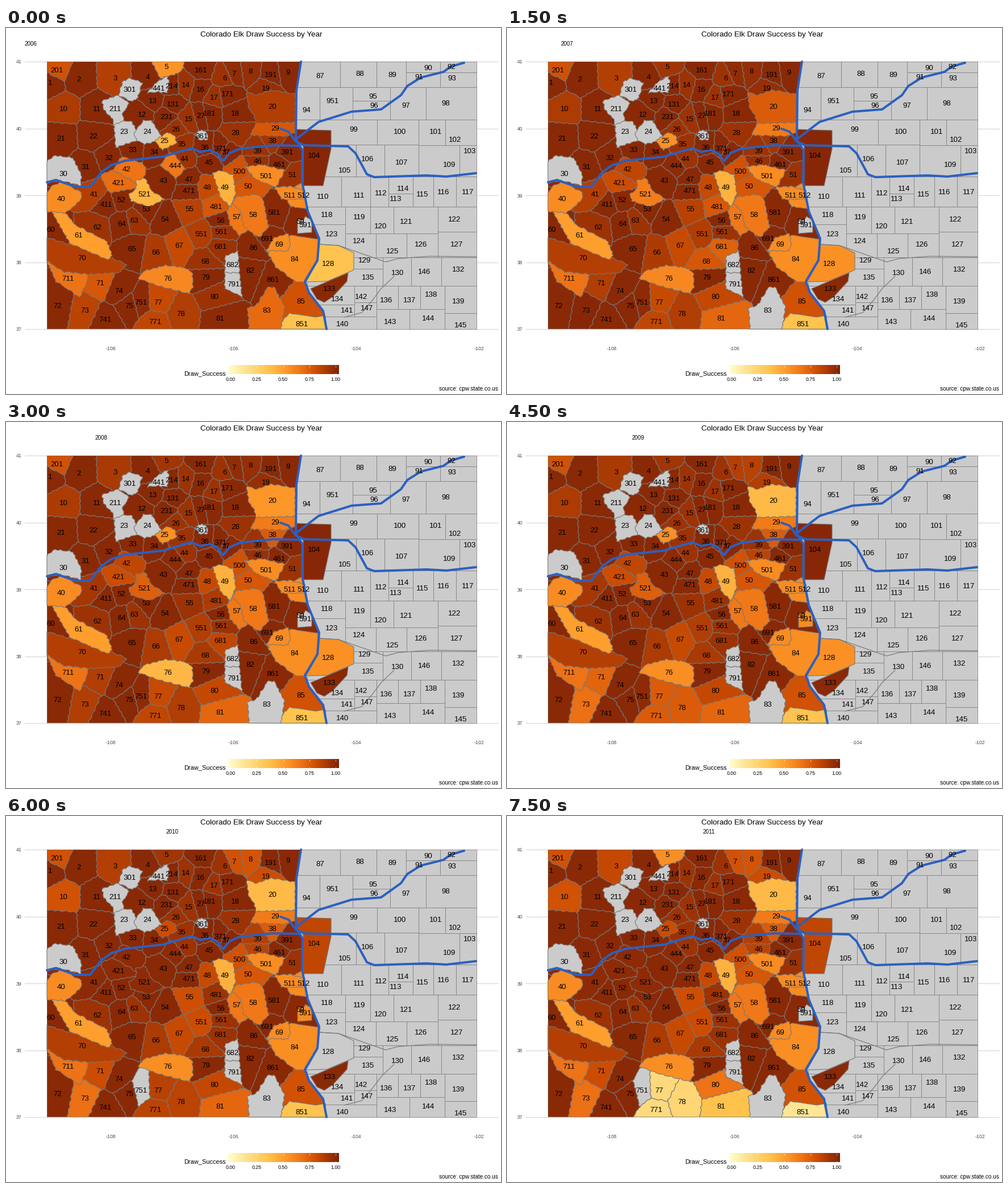
Write a matplotlib script that moves like this. It is 871 px wide and 643 px high and loops after 8000 ms.

```python
import numpy as np
import matplotlib.pyplot as plt
from matplotlib.animation import FuncAnimation
from matplotlib.colors import LinearSegmentedColormap
from matplotlib.patches import Polygon, Rectangle

W, H, DPI = 871, 643, 100
PT = 72 / DPI
LEFT, TOP, RIGHT, BOTTOM = 72, 59, 828, 529
NA = None
GRAY, BORDER, ROAD = "#cbcbcb", "#787878", "#2b60c0"

# Unit number and label position
NORTH_WEST = [
    (201, 89, 73), (1, 78, 95), (2, 128, 89), (3, 192, 87), (301, 218, 108),
    (4, 249, 85), (5, 282, 68), (441, 269, 105), (214, 291, 101),
    (14, 316, 100), (161, 343, 73), (16, 342, 107), (6, 385, 87),
    (7, 401, 80), (8, 430, 76), (191, 466, 81), (9, 496, 77), (19, 457, 105),
    (17, 366, 121), (171, 390, 116), (10, 101, 141), (11, 160, 141),
    (211, 192, 141), (12, 239, 151), (13, 258, 127), (131, 294, 134),
    (231, 282, 156), (15, 321, 159), (27, 343, 153), (181, 358, 150),
    (18, 403, 149), (20, 469, 138), (29, 474, 176), (28, 404, 183),
    (361, 345, 189), (26, 299, 177), (25, 279, 198), (24, 249, 181),
    (23, 208, 182), (22, 154, 190), (21, 97, 193)]
CENTRE = [
    (30, 101, 255), (31, 140, 243), (32, 181, 227), (33, 223, 213),
    (34, 261, 217), (35, 309, 204), (36, 350, 209), (371, 378, 211),
    (37, 387, 217), (38, 469, 198), (39, 443, 215), (391, 495, 218),
    (104, 542, 224), (46, 443, 234), (461, 481, 239), (45, 357, 236),
    (44, 314, 229), (444, 298, 242), (42, 212, 247), (421, 198, 271),
    (43, 277, 267), (47, 322, 265), (471, 322, 285), (48, 354, 279),
    (49, 385, 280), (500, 410, 251), (501, 458, 260), (50, 426, 277),
    (51, 504, 257), (511, 499, 293), (512, 524, 294), (521, 244, 291),
    (40, 97, 300), (41, 155, 292), (411, 176, 310), (52, 203, 302),
    (53, 247, 318), (54, 280, 336), (55, 323, 318), (481, 370, 313)]
SOUTH_WEST = [
    (56, 378, 338), (57, 406, 332), (58, 435, 328), (581, 472, 323),
    (59, 518, 339), (591, 527, 346), (60, 79, 353), (61, 128, 363),
    (62, 161, 349), (63, 226, 338), (64, 204, 343), (65, 222, 387),
    (66, 264, 394), (67, 305, 381), (551, 344, 362), (561, 379, 358),
    (681, 377, 384), (68, 351, 410), (682, 398, 415), (791, 400, 450),
    (82, 430, 426), (86, 436, 386), (691, 459, 370), (69, 481, 379),
    (84, 508, 405), (128, 567, 414), (133, 569, 457), (861, 469, 441),
    (70, 134, 404), (711, 109, 440), (71, 166, 448), (72, 91, 487),
    (73, 139, 496), (74, 199, 461), (741, 174, 512), (75, 217, 487),
    (751, 237, 482), (76, 285, 440), (77, 268, 481), (771, 262, 515),
    (78, 308, 501), (79, 352, 437), (80, 367, 472), (81, 377, 509),
    (83, 459, 495), (85, 519, 480), (851, 520, 520)]
NORTH_EAST = [
    (87, 553, 84), (88, 623, 80), (89, 680, 81), (90, 743, 69), (92, 784, 67),
    (91, 727, 86), (93, 785, 88), (951, 574, 128), (95, 646, 119),
    (96, 648, 136), (97, 704, 136), (98, 774, 132), (94, 529, 144),
    (99, 612, 177), (100, 693, 181), (101, 756, 181), (102, 790, 196),
    (103, 816, 216), (105, 596, 249), (106, 636, 229), (107, 696, 236),
    (109, 780, 239)]
MID_EAST = [
    (110, 558, 296), (111, 621, 293), (112, 660, 290), (113, 686, 300),
    (114, 699, 281), (115, 733, 291), (116, 770, 287), (117, 813, 287),
    (118, 565, 328), (119, 622, 332), (120, 659, 348), (121, 704, 339),
    (122, 789, 336), (123, 573, 362), (124, 621, 373), (125, 680, 391),
    (126, 730, 379), (127, 793, 380)]
SOUTH_EAST = [
    (129, 631, 408), (130, 689, 429), (146, 736, 427), (132, 796, 424),
    (135, 637, 437), (134, 583, 476), (142, 625, 471), (136, 669, 478),
    (137, 710, 477), (138, 748, 468), (139, 796, 480), (141, 600, 495),
    (147, 635, 492), (140, 592, 519), (143, 676, 516), (144, 743, 510),
    (145, 800, 521)]

# Percent drawn: steady units by level (all others 97), then those that
# change, each value holding from its year (counted from 2006) on
NO_DATA = (301, 211, 23, 24, 361, 441, 30, 682, 791)
STEADY = {92: (14, 17, 6, 35, 28, 15, 26, 62, 561, 63, 51, 44),
          88: (66,), 86: (70,), 81: (67, 48), 78: (201, 500, 85),
          76: (50,), 66: (711,), 64: (57, 58), 57: (40, 501, 511, 512, 69),
          56: (84,), 50: (61,), 43: (49,)}
CHANGES = {
    3: {0: 86, 2: 89, 4: 86, 5: 82}, 5: {0: 54, 1: 91, 5: 56},
    7: {0: 95, 3: 86, 4: 78}, 8: {0: 94, 3: 85, 4: 77},
    10: {0: 88, 4: 78}, 19: {0: 94, 3: 86, 4: 80},
    20: {0: 87, 1: 74, 2: 53, 3: 40}, 25: {0: 43, 1: 55, 4: 80},
    29: {0: 76, 1: 63}, 38: {0: 91, 2: 74}, 39: {0: 92, 4: 86},
    46: {0: 93, 3: 84}, 104: {0: 98, 4: 83}, 42: {0: 66, 1: 83, 4: 96},
    421: {0: 68, 1: 80, 4: 96}, 444: {0: 64, 1: 96}, 41: {0: 86, 2: 90, 4: 96},
    521: {0: 42, 1: 62, 2: 73, 4: 96}, 55: {0: 85, 2: 92, 4: 79},
    481: {0: 76, 2: 88, 3: 92}, 551: {0: 87, 4: 80},
    681: {0: 92, 1: 72, 2: 83, 3: 92}, 68: {0: 92, 1: 76, 2: 89},
    71: {0: 76, 1: 87, 3: 71, 4: 80}, 73: {0: 84, 1: 98, 2: 87, 3: 67},
    76: {0: 58, 2: 41, 3: 56}, 751: {0: 96, 4: NA},
    77: {0: 81, 3: 74, 4: 85, 5: 22}, 771: {0: 83, 3: 74, 4: 84, 5: 21},
    78: {0: 87, 3: 74, 4: 84, 5: 24}, 80: {0: 92, 1: 82, 5: 66},
    81: {0: 96, 1: 70, 5: 37}, 83: {0: 69, 1: NA}, 851: {0: 36, 5: 14},
    128: {0: 36, 1: 55, 4: NA}, 591: {0: NA, 3: 57, 5: NA}}

# Key corners of the units that a plain nearest-label cell cannot give
OUTLINES = {
    301: (205, 95, 218, 88, 240, 96, 232, 122, 222, 129, 198, 118),
    211: (169, 128, 198, 118, 217, 133, 205, 150, 208, 163, 190, 177, 188, 160, 172, 143),
    23: (190, 170, 208, 163, 222, 165, 229, 178, 230, 198, 193, 210),
    24: (225, 185, 242, 162, 256, 163, 274, 190, 262, 200, 245, 204, 230, 198),
    25: (262, 198, 283, 183, 297, 189, 300, 202, 275, 214),
    441: (249, 114, 262, 98, 284, 84, 287, 95, 284, 114, 268, 112),
    361: (333, 187, 345, 178, 356, 188, 354, 196, 342, 197),
    30: (72, 235, 85, 224, 118, 228, 133, 258, 131, 277, 95, 268, 72, 272),
    20: (423, 112, 440, 118, 466, 109, 509, 116, 509, 166, 440, 168, 437, 155, 427, 140),
    29: (440, 168, 509, 166, 509, 184, 490, 190, 430, 188),
    104: (511, 178, 572, 180, 572, 212, 558, 277, 523, 277, 523, 208, 510, 198),
    521: (216, 292, 229, 282, 229, 268, 245, 264, 256, 286, 279, 300, 252, 314, 220, 304),
    501: (420, 244, 450, 240, 491, 250, 475, 280, 440, 266),
    511: (473, 280, 500, 278, 526, 285, 526, 300, 485, 301),
    58: (404, 297, 440, 292, 452, 300, 462, 350, 445, 368, 419, 350, 412, 322, 398, 308),
    49: (363, 255, 378, 250, 400, 258, 404, 290, 395, 315, 378, 298, 372, 280),
    591: (513, 336, 523, 338, 527, 331, 538, 338, 538, 359, 513, 361),
    70: (72, 368, 110, 380, 140, 385, 212, 415, 200, 430, 145, 433, 100, 428, 72, 411),
    61: (80, 322, 105, 325, 120, 345, 178, 375, 187, 400, 178, 407, 112, 378, 100, 358),
    40: (72, 290, 80, 278, 100, 270, 133, 290, 132, 302, 105, 325, 72, 322),
    711: (72, 409, 100, 428, 145, 433, 141, 450, 130, 473, 88, 445),
    76: (233, 440, 242, 427, 280, 417, 315, 421, 328, 431, 329, 455, 322, 467, 265, 452),
    682: (386, 400, 408, 392, 411, 430, 385, 430),
    791: (385, 430, 411, 430, 415, 472, 385, 458),
    84: (458, 390, 500, 364, 549, 371, 549, 406, 527, 446, 510, 446, 475, 420),
    69: (472, 368, 497, 361, 500, 380, 496, 392, 458, 391),
    83: (425, 492, 440, 488, 460, 456, 472, 455, 490, 490, 484, 529, 428, 529),
    851: (487, 512, 500, 501, 545, 508, 562, 505, 563, 529, 483, 529),
    128: (528, 446, 549, 408, 551, 380, 585, 382, 612, 395, 612, 425, 565, 445),
    133: (536, 458, 602, 430, 600, 445, 575, 472, 560, 482, 547, 476)}

FRONT_RANGE = (519, 59, 511, 110, 510, 196, 522, 215, 521, 270, 531, 322, 551, 370,
               548, 408, 526, 445, 533, 465, 558, 497, 564, 529)
HIGHWAYS = [
    FRONT_RANGE,
    (72, 271, 88, 267, 122, 279, 148, 279, 168, 253, 185, 241, 210, 233, 276, 226,
     326, 211, 342, 218, 358, 214, 372, 221, 382, 234, 393, 220, 412, 212, 470, 206, 516, 207),
    (483, 177, 497, 182, 508, 197, 550, 165, 608, 147, 660, 143, 695, 118, 706, 102,
     730, 87, 770, 77, 782, 68, 806, 61),
    (509, 199, 525, 206, 602, 208, 615, 220, 635, 257, 648, 262, 740, 259, 775, 261, 827, 255)]
RIVERS = [
    (551, 380, 585, 382, 668, 411, 690, 405, 745, 401, 828, 402),
    (683, 436, 660, 458, 645, 478, 626, 500, 595, 508)]

plt.rcParams["font.family"] = "Liberation Sans"
cmap = LinearSegmentedColormap.from_list("success", [
    (0, "#ffffcc"), (.15, "#fee391"), (.36, "#fec44f"), (.52, "#fe9929"),
    (.67, "#ec7014"), (.8, "#cc4c02"), (1, "#7f2307")])

fig = plt.figure(figsize=(W / DPI, H / DPI), dpi=DPI, facecolor="white")
ax = fig.add_axes([0, 0, 1, 1])
ax.axis("off")


def text(x, y, s, size, color="black", ha="center"):
    return ax.text(x, y, s, fontsize=size * PT, color=color, ha=ha,
                   va="center_baseline", zorder=6)


def pairs(flat):
    return np.array(flat, float).reshape(-1, 2)


def line(*flat, color=BORDER, width=.8, z=2.5):
    ax.plot(*pairs(flat).T, color=color, lw=width * PT, zorder=z,
            solid_capstyle="round", solid_joinstyle="round")


def wiggle(pts):
    """Subdivide a closed outline and roughen it, except on the map frame."""
    out = []
    for a, b in zip(pts, np.roll(pts, -1, axis=0)):
        n = max(1, int(np.hypot(*(b - a)) / 3))
        out.append(a + (b - a) * np.arange(n)[:, None] / n)
    p = np.concatenate(out)
    x, y = p.T
    inside = (x > LEFT) & (x < 510) & (y > TOP) & (y < BOTTOM)
    dx = .9 * np.sin(.55 * y + .2 * x) + .5 * np.sin(1.1 * y - .3 * x)
    dy = .9 * np.sin(.5 * x - .25 * y) + .5 * np.sin(1.2 * x + .2 * y)
    return p + np.column_stack([dx, dy]) * inside[:, None]


def nearest_cell(seed, others):
    """Part of the map frame closer to seed than to any other label."""
    cell = [np.array(c, float) for c in
            ((LEFT, TOP), (RIGHT, TOP), (RIGHT, BOTTOM), (LEFT, BOTTOM))]
    for other in others:
        normal = other - seed
        limit = normal @ (seed + other) / 2
        kept = []
        for a, b in zip(cell, cell[1:] + cell[:1]):
            da, db = normal @ a - limit, normal @ b - limit
            if da <= 0:
                kept.append(a)
            if da * db < 0:
                kept.append(a + (b - a) * da / (da - db))
        cell = kept
    return np.array(cell)


def split_plains(labels, x0, y0, x1, y1):
    """Cut a block at its widest gap between labels until one is left."""
    if len(labels) == 1:
        ax.add_patch(Rectangle((x0, y0), x1 - x0, y1 - y0, fc=GRAY,
                               ec=BORDER, lw=.7 * PT, zorder=1))
        return
    best = None
    for axis, spacing in ((1, 1), (2, 1.35)):
        row = sorted(labels, key=lambda u: u[axis])
        for k in range(1, len(row)):
            a, b = row[k - 1][axis], row[k][axis]
            score = (b - a) * spacing * min(k, len(row) - k) ** .3
            if best is None or score > best[0]:
                best = score, axis, (a + b) / 2, row[:k], row[k:]
    _, axis, cut, low, high = best
    if axis == 1:
        split_plains(low, x0, y0, cut, y1)
        split_plains(high, cut, y0, x1, y1)
    else:
        split_plains(low, x0, y0, x1, cut)
        split_plains(high, x0, cut, x1, y1)


def rate(name, year):
    if name in NO_DATA:
        return NA
    if name in CHANGES:
        steps = CHANGES[name]
        return steps[max(y for y in steps if y <= year)]
    return next((r for r, names in STEADY.items() if name in names), 97)


# Grid, titles and legend
for i in range(5):
    y = TOP + i * 117.5
    line(33, y, 866, y, color="#d6d6d6", width=1.1, z=0)
    text(22.5, y, 41 - i, 8.8, "#4d4d4d")
for i in range(4):
    text(184 + 216 * i, 562, -108 + 2 * i, 8.8, "#4d4d4d")
text(449, 10.5, "Colorado Elk Draw Success by Year", 13.35)
text(866, 633, "source: cpw.state.co.us", 9.95, ha="right")
text(349.5, 606, "Draw_Success", 10.95)
ax.imshow(np.linspace(0, 1, 256)[None], cmap=cmap, aspect="auto",
          extent=(391, 586, 608.5, 592.5))
for i in range(5):
    x = 395 + 46.3 * i
    text(x, 616, f"{i / 4:.2f}", 8.8)
    for y in (592.5, 605.5):
        line(x, y, x, y + 3, color="white", width=.6)

# Plains
split_plains(NORTH_EAST, 511, TOP, RIGHT, 261)
split_plains(MID_EAST, 523, 261, RIGHT, 403)
split_plains(SOUTH_EAST, 530, 403, RIGHT, BOTTOM)

# Mountain units
west = NORTH_WEST + CENTRE + SOUTH_WEST
land = Polygon(pairs((LEFT, TOP) + FRONT_RANGE + (LEFT, BOTTOM)),
               fc=cmap(.97), zorder=1.5)
ax.add_patch(land)
seeds = {u[0]: np.array(u[1:], float) for u in west if u[0] not in OUTLINES}
patches = {}
for name, seed in seeds.items():
    cell = nearest_cell(seed, [s for n, s in seeds.items() if n != name])
    patches[name] = Polygon(wiggle(cell), zorder=2)
for name, flat in OUTLINES.items():
    patches[name] = Polygon(wiggle(pairs(flat)), zorder=2.2)
for name, patch in patches.items():
    patch.set(edgecolor=BORDER, linewidth=1.1 * PT, joinstyle="round")
    ax.add_patch(patch)
    if name in seeds:
        patch.set_clip_path(land)

for path in RIVERS:
    line(*path, width=1.2)
for path in HIGHWAYS:
    line(*path, color=ROAD, width=4, z=4)
for name, x, y in west + NORTH_EAST + MID_EAST + SOUTH_EAST:
    text(x, y, name, 13.2)

year_text = text(43, 27, "", 9.9)
ax.set(xlim=(0, W), ylim=(H, 0))


def update(i):
    year = min(i // 3, 5)
    year_text.set_text(str(2006 + year))
    year_text.set_x(43 + 62.4 * year)
    for name, patch in patches.items():
        r = rate(name, year)
        patch.set_facecolor(GRAY if r is NA else cmap(r / 100))
    return [year_text]


anim = FuncAnimation(fig, update, frames=16, interval=500, repeat=True,
                     init_func=lambda: update(0), blit=False)
plt.show()
```
